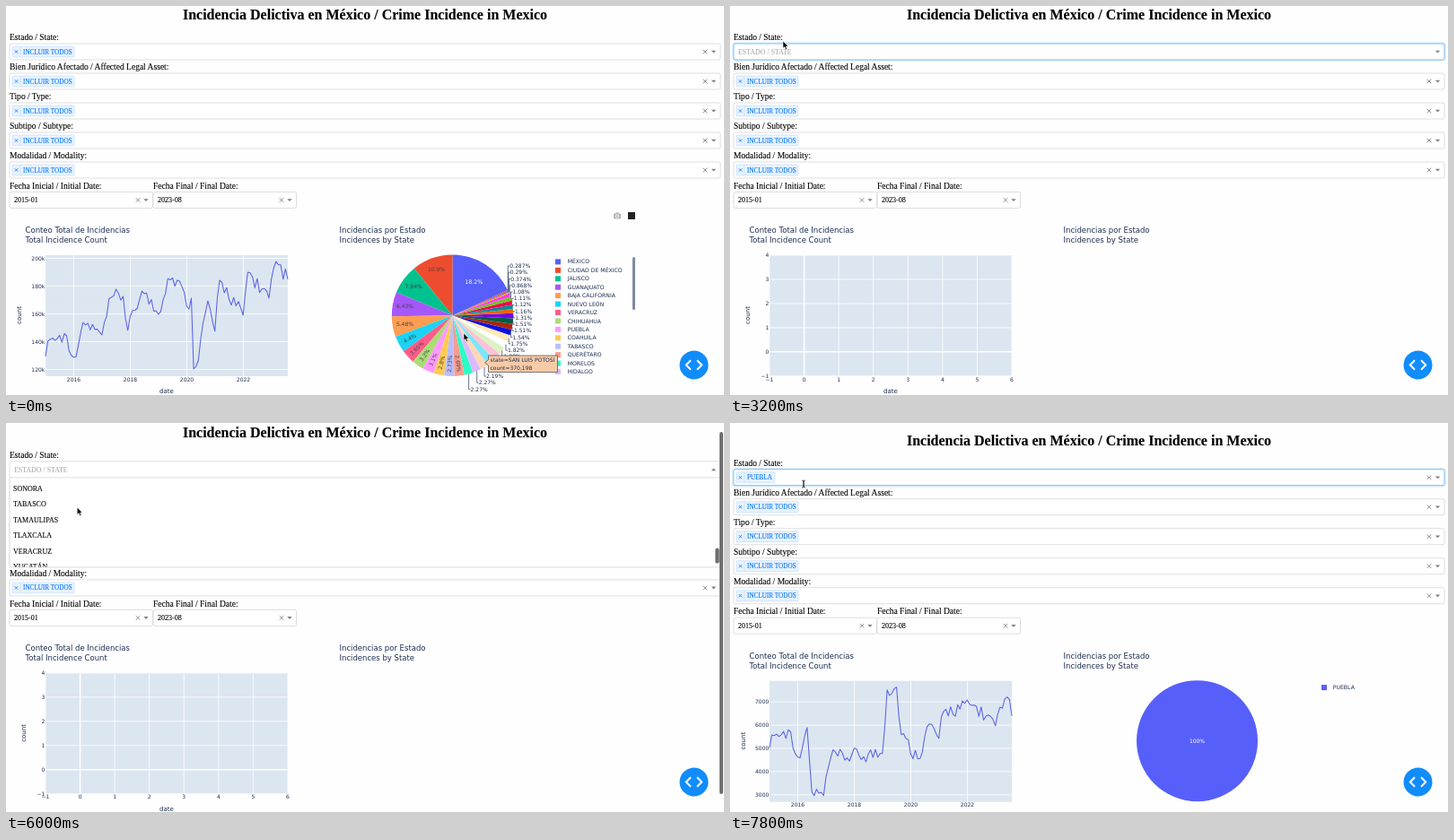
Recreate the animation shown at these times as an HTML page. Size 800 px wide and 434 px high, loop 8000 ms.

```html
<!DOCTYPE html>
<html lang="es">
<head>
<meta charset="utf-8">
<title>Incidencia Delictiva</title>
<style>
  html, body { margin: 0; width: 100%; height: 100%; overflow: hidden; background: #fefefe; }
  svg.stage { display: block; width: 100%; height: 100%; }
  text { white-space: pre; }
  .serif { font-family: "Liberation Serif", "Times New Roman", serif; fill: #000; stroke: #000; stroke-width: .1; }
  .plot { font-family: "DejaVu Sans", Verdana, sans-serif; fill: #1d2d50; }
  .tag { fill: #0076f5; stroke: #0076f5; }
  .hint { fill: #a0a0a0; stroke: none; }
  .mid { text-anchor: middle; }
  .end { text-anchor: end; }
  .box { fill: #fff; stroke: #d6d6d6; stroke-width: .8; }
  .focus .box { stroke: #7dbdec; stroke-width: 1; }
  .glow { fill: none; stroke: #e0f0fc; stroke-width: 2; visibility: hidden; }
  .focus .glow { visibility: visible; }
  .icon { stroke: #808080; stroke-width: .9; fill: none; }
</style>
</head>
<body>
<svg class="stage" viewBox="0 0 800 434" preserveAspectRatio="none">
  <rect width="800" height="434" fill="#fefefe"/>
  <g id="page"></g>
  <g id="fixed"></g>
</svg>
<script>
const LOOP = 8000, STEP = 200;
const $ = id => document.getElementById(id);
const range = (n, f) => Array.from({ length: n }, (_, i) => f(i));

// Keys are [position, ...values]; values run linearly between them.
function track(keys, t) {
  const next = keys.findIndex(k => k[0] > t);
  if (next < 0) return keys[keys.length - 1].slice(1);
  const a = keys[next - 1], b = keys[next], p = (t - a[0]) / (b[0] - a[0]);
  return a.slice(1).map((v, i) => v + (b[i + 1] - v) * p);
}

// Text placed by its left (or anchored) x and the vertical centre of its capitals.
const text = (x, y, size, str, cls = 'serif', extra = '') =>
  `<text x="${x}" y="${(y + size * .34).toFixed(2)}" font-size="${size}" class="${cls}" ${extra}>${str}</text>`;
const group = (id, body) => `<g id="${id}">${body}</g>`;
const cross = (x, y, r = 2.3) => `<path class="icon" d="M${x - r} ${y - r}l${2 * r} ${2 * r}m0 ${-2 * r}l${-2 * r} ${2 * r}"/>`;
const caret = (x, y, dir = 1) => `<path fill="#808080" d="M${x - 2.7} ${y - 1.3 * dir}h5.4l-2.7 ${2.8 * dir}z"/>`;
const box = (x, y, w) => `<rect class="box" x="${x}" y="${y - 9}" width="${w}" height="18" rx="2"/>`;

function tag(y, label, w) {
  return `<rect x="7" y="${y - 6}" width="${w}" height="12" rx="1" fill="#e8f2ff" stroke="#c2e0ff" stroke-width=".7"/>
    <path d="M16 ${y - 6}v12" stroke="#c2e0ff" stroke-width=".7"/>
    <path d="M9.8 ${y - 1.7}l3.4 3.4m0 -3.4l-3.4 3.4" stroke="#0076f5" stroke-width=".8"/>` +
    text(19, y + .1, 7.2, label, 'serif tag');
}

const allTag = y => tag(y, 'INCLUIR TODOS', 69);

function field(label, y) {
  return text(4, y - 16, 9.53, label) + box(4, y, 792) + allTag(y) + cross(779, y) + caret(788.5, y);
}

function dateField(x, label, value) {
  return text(x, 200.5, 9.53, label) + box(x, 216.5, 159.5) + text(x + 5, 216.5, 8, value) +
    cross(x + 143, 216.5) + caret(x + 152, 216.5);
}

/* ---------- charts ---------- */
const PLOT = { x: 44, y: 278, w: 270, h: 135 };

function axes(xTicks, yTicks, countX) {
  const bottom = PLOT.y + PLOT.h;
  const grid = (d, label) => `<path d="${d}" stroke="#fff" stroke-width="${label === '0' ? 1.5 : .8}"/>`;
  return `<rect x="${PLOT.x}" y="${PLOT.y}" width="${PLOT.w}" height="${PLOT.h}" fill="#dce6f0"/>` +
    xTicks.map(([x, s]) => grid(`M${x} ${PLOT.y}V${bottom}`, s) + text(x, 416.5, 6, s, 'plot mid')).join('') +
    yTicks.map(([y, s]) => grid(`M${PLOT.x} ${y}h${PLOT.w}`, s) + text(43.3, y + .1, 6, s, 'plot end')).join('') +
    text(179, 430, 7, 'date', 'plot mid') +
    text(0, 0, 7, 'count', 'plot mid', `transform="translate(${countX} 345) rotate(-90)"`);
}

const years = range(4, i => [75.5 + 63 * i, String(2016 + 2 * i)]);
const ticks = (n, x0, dx, first, step) => range(n, i => [x0 + dx * i, String(first + step * i).replace('-', '−')]);

// Turning points as [month, height above the axis]; the months between them jitter.
const NATIONAL = [[0, 22], [2, 41], [9, 45], [12, 21], [16, 60], [24, 46], [28, 88], [33, 89], [35, 51],
  [41, 95], [48, 69], [52, 109], [57, 106], [60, 78], [62, 87], [63, 8], [64, 11], [69, 84], [72, 50],
  [74, 107], [84, 68], [86, 116], [95, 87], [98, 128], [103, 108]];
const LOCAL = [[0, 60], [2, 74], [9, 78], [12, 50], [16, 83], [18, 11], [23, 7], [26, 49], [48, 54],
  [50, 125], [54, 128], [56, 75], [63, 48], [68, 87], [72, 71], [74, 101], [87, 108], [96, 85], [101, 117], [103, 96]];

function line(keys, jitter) {
  const noise = i => Math.abs(Math.sin(i * 12.9898) * 43758.5453) % 1 - .5;
  const points = range(104, i => {
    const turning = keys.some(k => k[0] === i);
    const h = track(keys, i)[0] + (turning ? 0 : jitter * noise(i));
    return `${(PLOT.x + i * PLOT.w / 103).toFixed(1)},${(PLOT.y + PLOT.h - h).toFixed(1)}`;
  });
  return `<polyline points="${points.join(' ')}" fill="none" stroke="#5a62e6" stroke-width="1.05" stroke-linejoin="round"/>`;
}

// Ten base hues, then the same ten lighter, darker and plain again.
const BASE = [[237, 94, 66], [9, 85, 56], [164, 100, 38], [269, 94, 66], [26, 100, 66],
  [189, 90, 53], [343, 100, 68], [89, 60, 66], [300, 100, 80], [42, 99, 66]];
function color(i) {
  const [h, s, l] = BASE[i % 10];
  return `hsl(${h}, ${s}%, ${Math.min(100, l + [0, 20, -20, 0][i / 10 | 0])}%)`;
}

// The percentages printed on the pie.
const SHARES = [18.2, 10.9, 7.94, 6.43, 5.48, 4.4, 3.65, 3.2, 3.1, 2.8, 2.73, 2.69, 2.27, 2.27, 2.19, 2.17,
  2.14, 1.98, 1.82, 1.75, 1.54, 1.51, 1.51, 1.31, 1.16, 1.12, 1.11, 1.08, .868, .374, .29, .287];
const LEGEND = ['MÉXICO', 'CIUDAD DE MÉXICO', 'JALISCO', 'GUANAJUATO', 'BAJA CALIFORNIA', 'NUEVO LEÓN', 'VERACRUZ',
  'CHIHUAHUA', 'PUEBLA', 'COAHUILA', 'TABASCO', 'QUERÉTARO', 'MORELOS', 'HIDALGO'];

function legend(x, gap, names) {
  return names.map((name, i) => {
    const y = 285.4 + 9.43 * i;
    return `<rect x="${x}" y="${y - 3}" width="6" height="6" fill="${color(i)}"/>` + text(x + gap, y, 6.15, name, 'plot');
  }).join('');
}

// The largest share runs clockwise from the top, the others counter-clockwise.
function pie() {
  const cx = 497.5, cy = 345.3, R = 67.7;
  const total = SHARES.reduce((a, b) => a + b);
  const at = (a, r) => [cx - r * Math.sin(a), cy - r * Math.cos(a)].map(v => +v.toFixed(2));
  let angle = -SHARES[0] / total * 2 * Math.PI, slices = '', labels = '';
  SHARES.forEach((share, i) => {
    const sweep = share / total * 2 * Math.PI, mid = angle + sweep / 2, name = share + '%';
    slices += `<path fill="${color(i)}" d="M${cx} ${cy}L${at(angle, R)}A${R} ${R} 0 0 0 ${at(angle + sweep, R)}z"/>`;
    if (i < 12) {
      const [x, y] = at(mid, i ? 54 : 44);
      const deg = mid * 180 / Math.PI;
      const turn = i < 5 ? 0 : 90 - deg + (deg > 180 ? 180 : 0);
      labels += text(0, 0, i ? 6 : 6.3, name, 'plot mid',
        `transform="translate(${x} ${y}) rotate(${turn.toFixed(1)})" style="fill:${i ? '#444' : '#fff'}"`);
    } else {
      const [x, y] = at(mid, R), labelY = 290 + 7.24 * (31 - i);
      labels += `<path d="M${x} ${y}V${labelY}h2" fill="none" stroke="#2a3f5f" stroke-width=".7"/>` +
        text(x + 2, labelY, 6, name, 'plot');
    }
    angle += sweep;
  });
  return slices + labels;
}

const tooltip = `<path d="M533.5 398L537.5 394.5V390H614.5V408.5H537.5V401z" fill="#f8cba8" stroke="#444" stroke-width=".7"/>` +
  text(539.5, 395.3, 6, 'state=SAN LUIS POTOSÍ', 'plot') + text(539.5, 403.5, 6, 'count=370,198', 'plot');
const modebar = `<rect x="677" y="231.5" width="8" height="6" rx="1" fill="#b4b4b4"/><rect x="679.5" y="230.5" width="3" height="2" fill="#b4b4b4"/>
  <circle cx="681" cy="234.5" r="1.7" fill="#b4b4b4" stroke="#fff" stroke-width=".8"/><rect x="693" y="230" width="8" height="8" fill="#222"/>`;

/* ---------- dropdown ---------- */
const STATES = ['INCLUIR TODOS', 'AGUASCALIENTES', 'BAJA CALIFORNIA', 'BAJA CALIFORNIA SUR', 'CAMPECHE', 'COAHUILA',
  'COLIMA', 'CHIAPAS', 'CHIHUAHUA', 'CIUDAD DE MÉXICO', 'DURANGO', 'GUANAJUATO', 'GUERRERO', 'HIDALGO', 'JALISCO',
  'MÉXICO', 'MICHOACÁN', 'MORELOS', 'NAYARIT', 'NUEVO LEÓN', 'OAXACA', 'PUEBLA', 'QUERÉTARO', 'QUINTANA ROO',
  'SAN LUIS POTOSÍ', 'SINALOA', 'SONORA', 'TABASCO', 'TAMAULIPAS', 'TLAXCALA', 'VERACRUZ', 'YUCATÁN', 'ZACATECAS'];
const ROW = 17.5, VIEW = 100, CONTENT = ROW * STATES.length;

const menu = `<rect x="4" y="60" width="792" height="${VIEW}" fill="#fff"/>
  <svg x="0" y="60" width="800" height="${VIEW}" overflow="hidden">` +
  group('options', STATES.map((s, i) => text(8, ROW * (i + .5), 8, s)).join('')) + `</svg>
  <path d="M4 60V160H796V60" fill="none" stroke="#d0d0d0" stroke-width=".8"/>
  <path d="M4.5 60.2H795.5" stroke="#e6e6e6" stroke-width=".8"/>
  <rect id="thumb" x="790.3" width="4.4" height="17" rx="2.2" fill="#6f6f6f"/>`;

/* ---------- page ---------- */
const FILTERS = ['Bien Jurídico Afectado / Affected Legal Asset:', 'Tipo / Type:', 'Subtipo / Subtype:', 'Modalidad / Modality:'];
const chartTitle = (x, es, en) => text(x, 250, 8.5, es, 'plot') + text(x, 261, 8.5, en, 'plot');

$('page').innerHTML =
  text(400, 10, 16, 'Incidencia Delictiva en México / Crime Incidence in Mexico', 'serif mid', 'font-weight="bold"') +
  text(4, 35, 9.53, 'Estado / State:') +
  group('stateField',
    '<rect class="glow" x="3.2" y="41.2" width="793.6" height="19.6" rx="3"/>' + box(4, 51, 792) +
    group('tagAll', allTag(51)) + group('tagOne', tag(51, 'PUEBLA', 43)) +
    group('hint', text(9, 51, 7.9, 'ESTADO / STATE', 'serif hint')) +
    group('clear', cross(779, 51)) + group('down', caret(788.5, 51)) + group('up', caret(788.5, 51, -1)) +
    group('caret', '<path d="M9.4 46.5v9.5" stroke="#222" stroke-width=".9"/>')) +
  FILTERS.map((s, i) => field(s, 84 + 33 * i)).join('') +
  dateField(4, 'Fecha Inicial / Initial Date:', '2015-01') +
  dateField(164, 'Fecha Final / Final Date:', '2023-08') +
  chartTitle(21.5, 'Conteo Total de Incidencias', 'Total Incidence Count') +
  chartTitle(371.5, 'Incidencias por Estado', 'Incidences by State') +
  group('full',
    axes(years, range(5, i => [281.5 + 31 * i, 200 - 20 * i + 'k']), 14.2) + line(NATIONAL, 18) + pie() +
    legend(612, 13.7, LEGEND) + '<rect x="698" y="280" width="3" height="59" rx="1.5" fill="#7f89a0"/>') +
  group('empty', axes(ticks(8, 44, 38.57, -1, 1), ticks(6, 278, 26.95, 4, -1), 20)) +
  group('single',
    axes(years, ticks(5, 301.5, 25.9, 7000, -1000), 14.2) + line(LOCAL, 18) +
    `<circle cx="520.5" cy="345" r="67.5" fill="${color(0)}"/>` +
    text(520.5, 345, 6, '100%', 'plot mid', 'style="fill:#fff"') + legend(659, 12.8, ['PUEBLA'])) +
  group('modebar', modebar) + group('tooltip', tooltip) + group('menu', menu);

$('fixed').innerHTML =
  `<circle cx="766.5" cy="400.5" r="16" fill="#118cfb"/>
   <path d="M763 395.3l-5.2 5.2l5.2 5.2M770 395.3l5.2 5.2l-5.2 5.2" fill="none" stroke="#fff" stroke-width="2"/>
   <rect id="pageBar" x="795" width="4" height="404" rx="2" fill="#6f6f6f"/>` +
  group('arrow', '<path d="M0 0V8.2L1.9 6.6L3.1 9.4L4.6 8.8L3.4 6.1H5.8z" fill="#000" stroke="#fff" stroke-width=".6"/>') +
  group('beam', '<path d="M-1.8 -4Q0 -4 0 -3V3Q0 4 -1.8 4M1.8 -4Q0 -4 0 -3V3Q0 4 1.8 4" fill="none" stroke="#222" stroke-width=".9"/>');

/* ---------- motion ---------- */
const POINTER = [[0, 510, 365], [1200, 105, 42], [1800, 12, 49], [2400, 12, 49], [3200, 59, 39],
  [3800, 79, 91], [5800, 79, 91], [6600, 80, 103], [7400, 82, 68]];
const MENU_SCROLL = [[0, 0], [4000, 12], [4200, 46], [5000, CONTENT - VIEW], [5800, CONTENT - VIEW], [6600, 373.7]];
const PAGE_SHIFT = [[0, 0], [4800, 0], [5200, -18.3], [5600, -18.3], [6200, 10.5], [7200, 10.5], [7400, 9.7]];

const show = (id, on) => { $(id).style.display = on ? '' : 'none'; };
const move = (id, x, y) => $(id).setAttribute('transform', `translate(${x} ${y})`);

function render(now) {
  const t = Math.floor(now % LOOP / STEP) * STEP;
  const cleared = t >= 2200 && t < 7400, open = t >= 3600 && t < 7400, picked = t >= 7400;
  const [shift] = track(PAGE_SHIFT, t), [x, y] = track(POINTER, t);
  const scroll = t < 3800 ? 0 : track(MENU_SCROLL, t)[0];

  move('page', 0, shift);
  move('options', 0, -scroll);
  $('thumb').setAttribute('y', 60.5 + scroll / CONTENT * VIEW);
  $('pageBar').setAttribute('y', 26 - (shift + 18) * .85);
  show('pageBar', t >= 5000 && t < 6600);

  $('stateField').setAttribute('class', (cleared && !open) || picked ? 'focus' : '');
  show('tagAll', t < 2200);
  show('tagOne', picked);
  show('hint', cleared);
  show('clear', !cleared);
  show('down', !open);
  show('up', open);
  show('menu', open);
  show('caret', cleared && t % 1000 >= 400);

  show('full', t < 2800);
  show('empty', t >= 2800 && t < 7600);
  show('single', t >= 7600);
  show('tooltip', t < 200);
  show('modebar', t < 600);

  show('arrow', !picked);
  show('beam', picked);
  move('arrow', x, y);
  move('beam', x, y);
}

const start = performance.now();
function tick() {
  render(performance.now() - start);
  requestAnimationFrame(tick);
}
tick();
</script>
</body>
</html>
```
